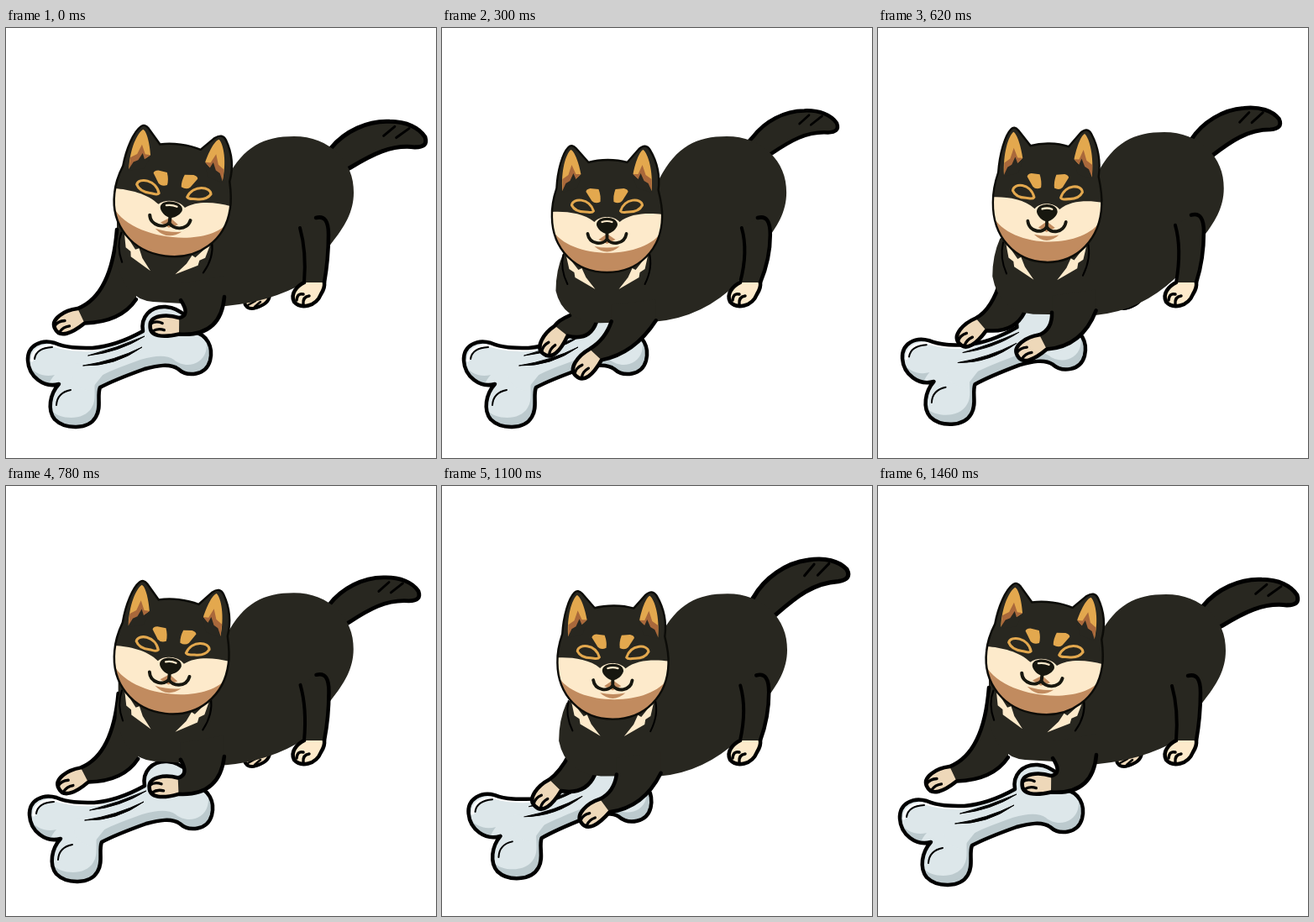
Animation of 512x512 px, one loop 1.5 s. Source, as an HTML page with a canvas:

```html
<!DOCTYPE html>
<html lang="en">
<head>
<meta charset="utf-8">
<title>Happy dog with a bone</title>
<style>
  html, body { margin: 0; width: 100%; height: 100%; overflow: hidden; background: #fff; }
  canvas { display: block; }
</style>
</head>
<body>
<canvas id="stage" width="512" height="512"></canvas>
<script>
const ctx = document.getElementById('stage').getContext('2d');
const LOOP = 1500, STEP = 20, CYCLE = 1460, FIRST_HOP = 760;
const FUR = '#282720', INK = '#17170f', CREAM = '#fdeacb', PAW = '#eed8b9', TAN = '#c18b5f', ORANGE = '#e3a84e';

// Key points of the loose parts; everything else follows from the crouch.
const TIMES = [0, 300, 460, 780, 960, 1260];
const TAIL_TIP = [[500, 132], [471, 115], [465, 93], [492, 127], [485, 104], [485, 106]];
const HEAD = [[198, 206, 1], [196.5, 225, 1], [205.5, 216.5, 1.075],
              [197, 204, 1.02], [202, 207, 1], [203.5, 214, 1.02]]; // x, y, stretch
const BONE = [[0, 0, 0], [0, 0, 0], [5, -3, -1.6], [2, -4, 0], [4, -9, 0], [9, -5, -3.7]]; // x, y, angle

// Leg poses: shoulder, upper bend, paw, paw angle, lower bend, armpit.
const LEFT_REACH = [132, 240, 126, 318, 75, 350, 152, 137, 350, 155, 323];
const LEFT_POUNCE = [157, 345, 143, 349, 138, 374, 125, 181, 374, 189, 351];
const RIGHT_REACH = [208, 324, 220, 342, 190, 355, 178, 256, 368, 260, 320];
const RIGHT_POUNCE = [206, 350, 198, 372, 176, 402, 129, 233, 388, 259, 349];

const BONE_SHAPE = 'M26,396C25,378 42,370 58,375C72,381 85,381 103,381C125,379 145,371 163,361' +
  'C160,344 172,331 190,332C212,334 220,350 222,361C240,365 247,380 243,396C238,414 216,416 205,406' +
  'C195,399 180,402 165,406C140,415 125,421 112,428C108,437 114,452 107,463C98,479 70,478 58,466' +
  'C49,455 52,436 63,424C45,429 27,415 26,396Z';
const TAIL_SHAPE = 'M-30,8L-11,-11C5,-31 32,-44 58,-43C78,-43 93,-36 100,-25C103,-16 98,-13 88,-13' +
  'C60,-16 38,-4 12,12L-10,24';
const SKULL = 'M-65.5,0C-66,-12 -63,-25 -60,-34C-59,-55 -53,-76 -46,-83Q-42,-87 -37,-82L-22,-65' +
  'C-8,-69 10,-69 24,-65L38,-81Q46,-88 51,-80C60,-65 63,-48 61,-32C64,-20 66,-10 65.5,0' +
  'C65,38 38,66 0,66C-38,66 -65,38 -65.5,0Z';

const mix = (a, b, amount) => a.map((v, i) => v + (b[i] - v) * amount);

// Two hops, the second one lower.
const crouchAt = t => t < FIRST_HOP
  ? 1.03 * Math.sin(Math.PI * t / FIRST_HOP)
  : .75 * Math.sin(Math.PI * (t - FIRST_HOP) / (CYCLE - FIRST_HOP));

// Smooth closed curve through the key points.
function follow(points, t) {
  const n = TIMES.length;
  const time = i => TIMES[(i + n) % n] + Math.floor(i / n) * CYCLE;
  const point = i => points[(i + n) % n];
  const i = TIMES.findLastIndex(k => k <= t);
  const span = time(i + 1) - time(i), u = (t - time(i)) / span;
  return point(i).map((a, j) => {
    const b = point(i + 1)[j];
    const m = (b - point(i - 1)[j]) / (time(i + 1) - time(i - 1)) * span;
    const k = (point(i + 2)[j] - a) / (time(i + 2) - time(i)) * span;
    return a + u * (m + u * (3 * (b - a) - 2 * m - k + u * (2 * (a - b) + m + k)));
  });
}

function paint(d, fill, line, width = 2) {
  const path = new Path2D(d);
  if (fill) { ctx.fillStyle = fill; ctx.fill(path); }
  if (line) { ctx.strokeStyle = line; ctx.lineWidth = width; ctx.stroke(path); }
}

function group(x, y, degrees, sx, sy, draw) {
  ctx.save();
  ctx.translate(x, y);
  ctx.rotate(degrees * Math.PI / 180);
  ctx.scale(sx, sy);
  draw();
  ctx.restore();
}

function clipped(d, draw) {
  ctx.save();
  ctx.clip(new Path2D(d));
  draw();
  ctx.restore();
}

function mirrored(draw) {
  draw();
  group(0, 0, 0, -1, 1, draw);
}

function drawBone() {
  ctx.translate(-85, -440);
  clipped(BONE_SHAPE, () => {
    paint(BONE_SHAPE, '#bccace');
    group(-5, -11, 0, 1, 1, () => paint(BONE_SHAPE, '#dde7ea'));
    paint('M78,400Q100,396 116,412L100,432Q76,430 78,400Z', '#dde7ea');
    paint('M31,396Q32,378 56,378Q84,386 110,383', null, '#fff', 3);
  });
  paint(BONE_SHAPE, null, '#000', 4.5);
  paint('M92,402Q130,403 162,380Q130,396 92,402ZM98,390Q135,386 165,367Q132,381 98,390Z', '#000', '#000', 1);
  paint('M34,394Q36,381 55,380M60,449Q61,434 77,431', null, '#000', 2);
}

function drawTail(x, y, [tipX, tipY]) {
  const restAngle = -12.8, restLength = 103.6;
  const scale = Math.hypot(tipX - x, tipY - y) / restLength;
  const angle = Math.atan2(tipY - y, tipX - x) * 180 / Math.PI - restAngle;
  group(x, y, angle, scale, scale, () => {
    paint(TAIL_SHAPE, FUR, '#000', 5);
    paint('M51,-26L64,-37M66,-24L81,-35', null, '#000', 3);
  });
}

function drawBody(crouch, sway, stretch) {
  const hx = 343 - 4 * crouch, hy = 129 - 90 * (stretch - 1);
  const [cx, cy, bx, by, qx, qy] =
    mix([131, 272, 262, 331, 175, 326], [140, 314, 259, 350, 192, 352], crouch).map((v, i) => i % 2 ? v : v + sway);
  paint(`M${cx},${cy}Q${cx},${cy - 25} ${cx + 9},${cy - 45}L${hx - 80},${hy + 50}
    C${hx - 60},${hy + 12} ${hx - 36},${hy} ${hx},${hy}
    C${hx + 42},${hy} ${hx + 72},${hy + 30} ${hx + 71},${hy + 67}
    C${hx + 71},${hy + 90} ${hx + 60},${hy + 108} ${hx + 44},${hy + 128}L${hx + 13},${hy + 174}
    Q${hx - 28},${by - 5} ${bx},${by}L${qx},${qy}Q${cx + 8},${qy - 3} ${cx},${cy}Z`, FUR);
}

function drawFarPaw() {
  paint('M286,322C281,332 290,336 298,333C308,330 315,324 314,315Z', PAW, '#000', 4);
  paint('M288,330L297,325M296,332L303,326', null, '#000', 2.5);
}

function drawHindLeg(x, y) {
  const back = `M${369 + x},${226 + y}C${380 + x},${223 + y} ${384 + x},${231 + y} ${384 + x},${246 + y}
    Q${384 + x},275 379,303`;
  const paw = 'M355,303C347,307 338,316 343,326C351,335 369,332 375,317Q380,309 379,303';
  paint(`${back}L355,303L${350 + x},${238 + y}Z`, FUR);
  paint(paw, CREAM, '#000', 4.5);
  paint('M346,324Q347,315 354,317M354,329Q353,320 361,319', null, '#000', 3.5);
  paint(`M${350 + x},${238 + y}Q${358 + x},${266 + y} 355,303`, null, '#000', 4);
  paint(back, null, '#000', 4.5);
}

function drawFrontLeg([sx, sy, ux, uy, px, py, degrees, lx, ly, ax, ay]) {
  const angle = degrees * Math.PI / 180, c = Math.cos(angle) * .92, s = Math.sin(angle) * .92;
  const at = (x, y) => `${px + x * c - y * s},${py + x * s + y * c} `;
  const paw = `C${at(-2, 16)}${at(20, 15)}${at(20, 1)}C${at(21, -13)}${at(4, -15)}${at(-17, -11)}`;
  const outline = `M${sx},${sy}Q${ux},${uy} ${at(-18, 10)}${paw}Q${lx},${ly} ${ax},${ay}`;
  paint(`${outline}V${ay - 25}L${sx},${sy - 20}Z`, FUR);
  paint(`M${at(-18, 10)}${paw}Z`, PAW);
  paint(outline, null, '#000', 4.5);
  paint(`M${at(19, 4)}Q${at(12, 8)}${at(4, 4)}M${at(17, -6)}Q${at(10, -2)}${at(2, -5)}`, null, '#000', 3.3);
}

function drawHead() {
  paint('M-52,45Q-56,62 -47,80M50,42Q55,60 45,80', null, '#000', 2);
  mirrored(() => paint('M-49,44L-45,62L-39,66L-38,72L-14,86L-25,72L-30,61L-34,63Z', CREAM));
  clipped(SKULL, () => {
    paint(SKULL, FUR);
    paint('M-66,-6C-50,-7 -28,-5 -15,6C-8,-2 8,-2 15,6C28,-5 50,-5 66,-3V70H-66Z', CREAM);
    paint('M-66,14C-45,52 45,52 66,16V70H-66Z', TAN);
  });
  paint(SKULL, null, '#0c0c08', 2.4);
  mirrored(() => {
    paint('M-53,-31C-55,-55 -49,-75 -43,-80C-38,-78 -33,-62 -31,-51L-37,-45Q-44,-40 -53,-31Z', ORANGE);
    paint('M-53,-31L-53,-45L-46,-50L-42,-62L-37,-51L-31,-51L-38,-44Z', '#a9683b');
    paint('M-54,-29L-49,-40L-44,-43L-40,-52L-37,-45L-30,-50L-36,-34Z', FUR);
    paint('M-25,-30Q-25,-33 -20,-34L-10,-33Q-7,-25 -8,-18Q-14,-15 -18,-19Z', ORANGE);
    paint('M-42,-14C-41,-23 -21,-23 -16,-7C-18,-4 -22,-6 -26,-6C-33,-6 -39,-8 -42,-14Z', null, ORANGE, 3);
  });
  paint('M-10,27L0,20L10,27L0,32ZM-15,35Q0,48 15,35Q0,38 -15,35Z', TAN);
  paint('M-23,20C-21,33 -4,34 0,26C4,34 21,33 23,20M0,18V26', null, INK, 3.8);
  paint('M-12.5,9C-12.5,-2 12.5,-2 12.5,9C12,14 5,20 0,20C-5,20 -12,14 -12.5,9Z', INK);
  paint('M-6,6Q0,4 6,6', null, CREAM, 2.2);
}

function draw(t) {
  const crouch = crouchAt(t);
  const [headX, headY, stretch] = follow(HEAD, t);
  const [boneX, boneY, boneAngle] = follow(BONE, t);
  const sway = (headX - 201) * crouch ** 2;
  const lift = 60 * (stretch - 1);
  const leg = (reach, pounce) => {
    ctx.save();
    ctx.translate(sway, 0);
    drawFrontLeg(mix(reach, pounce, crouch));
    ctx.restore();
  };

  ctx.fillStyle = '#fff';
  ctx.fillRect(0, 0, 512, 512);
  group(85 + boneX, 440 + boneY, boneAngle, 1, 1, drawBone);
  drawTail(398 - 18 * crouch - lift, 154 - 15 * crouch - lift, follow(TAIL_TIP, t));
  drawFarPaw();
  leg(LEFT_REACH, LEFT_POUNCE);
  drawBody(crouch, sway, stretch);
  drawHindLeg(7 * crouch, -lift);
  leg(RIGHT_REACH, RIGHT_POUNCE);
  group(headX, headY, 7.5 * (1 - crouch) ** 2, (1.06 - .06 * crouch) / stretch ** .7, stretch, drawHead);
}

function tick() {
  const t = Math.floor(performance.now() % LOOP / STEP) * STEP;
  draw(t >= CYCLE ? 0 : t);
  requestAnimationFrame(tick);
}

ctx.lineCap = ctx.lineJoin = 'round';
tick();
</script>
</body>
</html>
```
